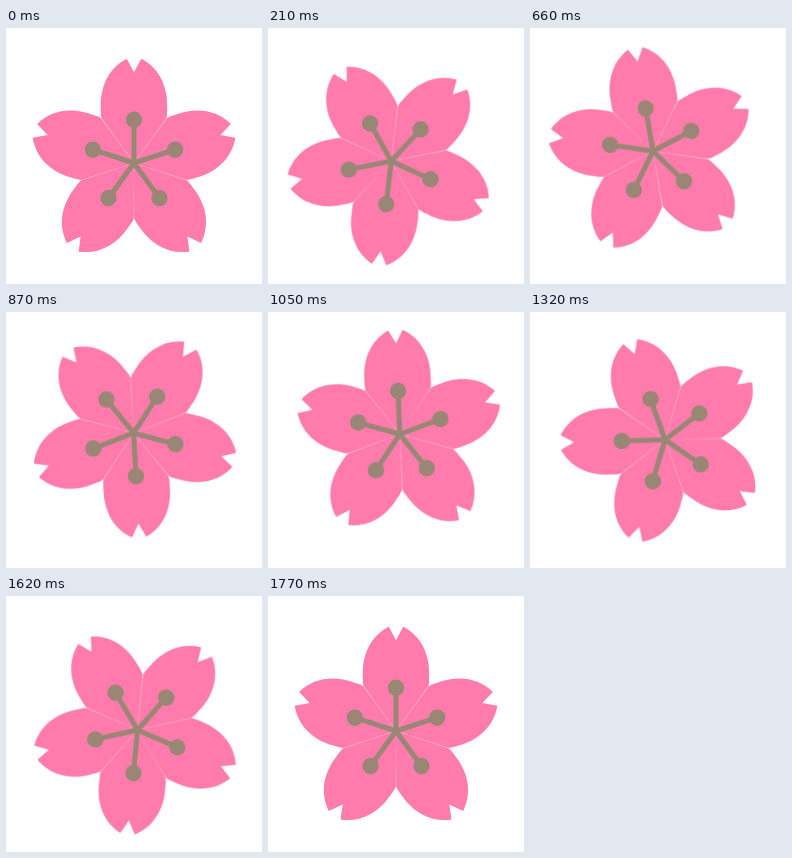
Write an HTML page that moves like this. It is 256 px wide and 256 px high and loops after 1800 ms.

```html
<!DOCTYPE html>
<html lang="en">
<head>
<meta charset="utf-8">
<title>Spinning blossom</title>
<style>
  html, body { margin: 0; width: 100%; height: 100%; overflow: hidden; background: #fff; }
  svg { display: block; width: 100vw; height: 100vh; }
  /* The pivot is the stage centre, a little above the blossom's own centre. */
  #spin { transform-origin: 128px 128px; }
</style>
</head>
<body>
<svg viewBox="0 0 256 256">
  <defs>
    <path id="petal" fill="#ff7bac" d="M0 0 L32.5 -45 C33.2 -48 33.4 -52 33.2 -55
      C34 -77 25 -95 7.2 -104.2 L0 -90.8 L-7.2 -104.2
      C-25 -95 -34 -77 -33.2 -55 C-33.4 -52 -33.2 -48 -32.5 -45 Z"/>
    <g id="stamen" fill="#998675">
      <path d="M0 0 V-43" stroke="#998675" stroke-width="5" stroke-linecap="round"/>
      <circle cy="-43.3" r="8.2"/>
    </g>
  </defs>
  <g id="spin"><g id="flower" transform="translate(128 135)"></g></g>
</svg>
<script>
  const NS = 'http://www.w3.org/2000/svg';
  const flower = document.getElementById('flower');

  function ring(id) {
    for (let i = 0; i < 5; i++) {
      const use = document.createElementNS(NS, 'use');
      use.setAttribute('href', '#' + id);
      use.setAttribute('transform', `rotate(${i * 72})`);
      flower.append(use);
    }
  }

  ring('petal');
  ring('stamen');

  // 60 poses of 30 ms; the first and last are the same.
  document.getElementById('spin').animate(
    [{ transform: 'rotate(0deg)' }, { transform: 'rotate(360deg)' }],
    { duration: 1800, iterations: Infinity, easing: 'steps(60, jump-none)' }
  );
</script>
</body>
</html>
```
